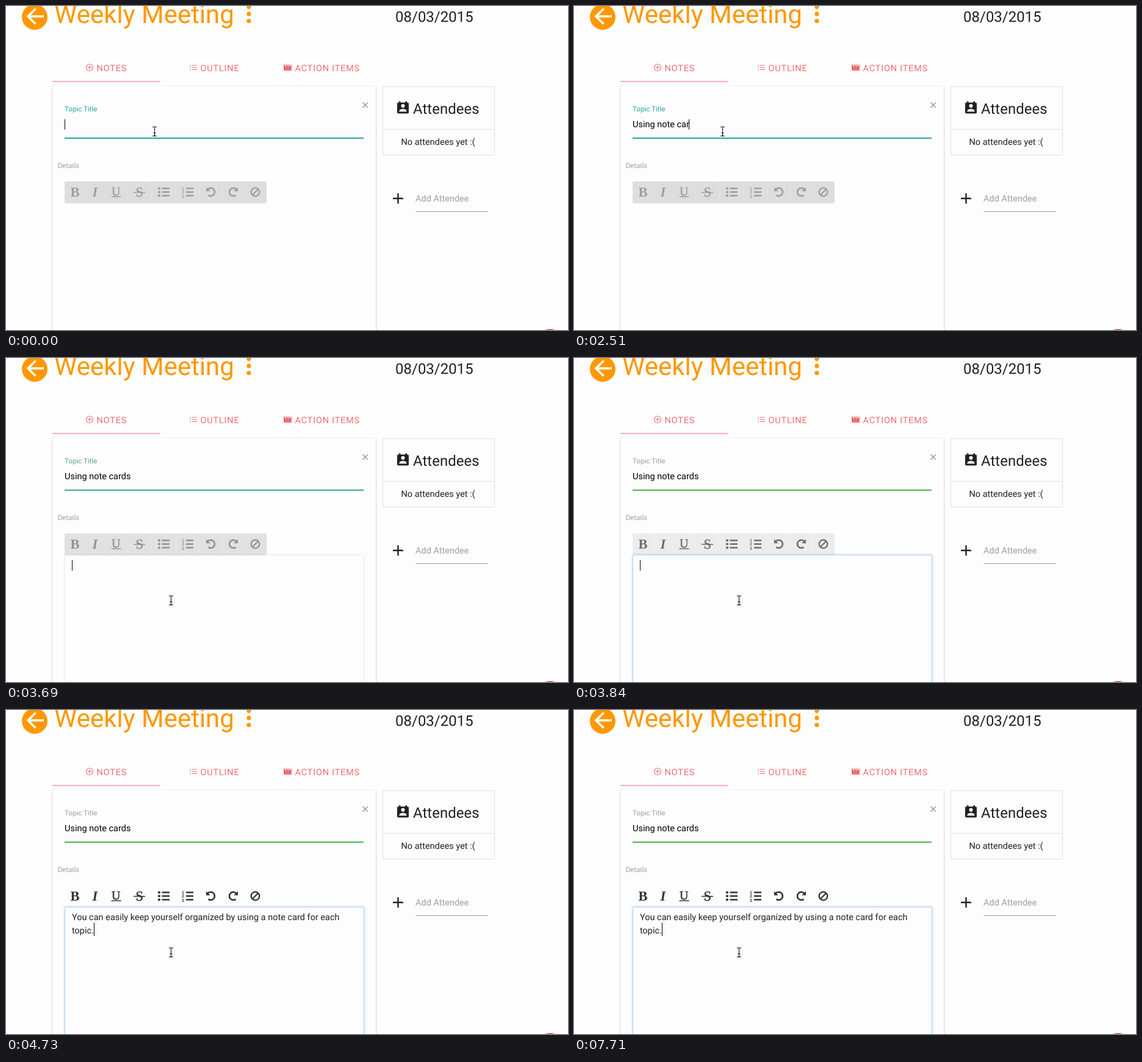
An HTML page for the animation above (8 s loop, 921 by 532 pixels).

```html
<!DOCTYPE html>
<html lang="en">
<head>
<meta charset="utf-8">
<title>Weekly Meeting</title>
<style>
  html, body { margin: 0; width: 100%; height: 100%; overflow: hidden; background: #fdfdfd; }
  svg { display: block; width: 921px; height: 532px; }
  text { font: 14.5px Roboto, sans-serif; fill: #212121; white-space: pre; text-rendering: geometricPrecision; }
  .big { font-size: 24px; }
  .small { font-size: 11.6px; fill: #9e9e9e; }
  .tab text { fill: #ee6e73; letter-spacing: .8px; }
  .line { fill: none; stroke: currentColor; }
  #tools { color: #9e9e9e; fill: currentColor; }
  #tools text { font: bold 22.5px "Liberation Serif", serif; fill: currentColor; }
  #tools .num { font: bold 7px "Liberation Sans", sans-serif; }
  .card { filter: drop-shadow(0 1px 1.5px rgba(0,0,0,.3)); }
</style>
</head>
<body>
<svg viewBox="0 0 921 532">
  <rect width="921" height="532" fill="#fdfdfd"/>

  <g fill="#ff9800">
    <circle cx="47" cy="18" r="21"/>
    <path d="M62 17H36M48.5 4.500L36 17L48.500 29.500" fill="none" stroke="#fff" stroke-width="3.600"/>
    <text x="79" y="28" style="font-size:42px;fill:#ff9800">Weekly Meeting</text>
    <circle cx="398" cy="1.500" r="3.600"/><circle cx="398" cy="13" r="3.600"/><circle cx="398" cy="24.500" r="3.600"/>
  </g>
  <text class="big" x="638" y="26">08/03/2015</text>

  <g class="tab" color="#ee6e73" fill="#ee6e73">
    <g class="line" stroke-width="1.200">
      <circle cx="137" cy="101" r="5.500"/>
      <path d="M134 101h6M137 98v6"/>
      <path d="M301 97.500h2m1.500 0h8.500M301 101h2m1.500 0h8.500M301 104.500h2m1.500 0h8.500"/>
    </g>
    <path d="M455 96h1.500l1.200 2.500h2L458.500 96h2l1.200 2.500h2L462.500 96h2l1.200 2.500h1.500L466.500 96h1.500v10h-13z"/>
    <text x="148.500" y="107">NOTES</text>
    <text x="318.500" y="107">OUTLINE</text>
    <text x="473.500" y="107">ACTION ITEMS</text>
    <rect x="76" y="123" width="177" height="2" fill="#f6b2b5"/>
  </g>

  <rect class="card" x="76" y="132" width="530" height="420" rx="1.500" fill="#fdfdfd"/>
  <path d="M584.500 158.500l8.500 8.500m0-8.500l-8.500 8.500" stroke="#8c8c8c" stroke-width="1.100"/>
  <text id="label" class="small" x="96" y="173">Topic Title</text>
  <text id="topic" x="96" y="199" style="fill:#000"></text>
  <rect id="rule" x="96" y="216" width="490" height="2"/>
  <text class="small" x="84.500" y="266">Details</text>

  <g id="tools">
    <g id="bar">
      <rect x="96" y="288" width="331" height="36" rx="2.500"/>
      <path d="M131.500 288v36M162.500 288v36M199.500 288v36M238.500 288v36M278.500 288v36M317.500 288v36M354.500 288v36M390.500 288v36" stroke="#fff" stroke-opacity=".2"/>
    </g>
    <text x="105.500" y="313">B</text>
    <text x="141.500" y="313" style="font-style:italic">I</text>
    <text x="173" y="310.500" style="font-size:20px;font-weight:400" stroke="currentColor" stroke-width=".5">U</text>
    <text x="212.500" y="313" style="font-weight:400" stroke="currentColor" stroke-width=".5">S</text>
    <path d="M172.500 312.500h16v1.500h-16zM209 305.200h19v1.500h-19z"/>
    <circle cx="251" cy="299.500" r="2.100"/><circle cx="251" cy="305.500" r="2.100"/><circle cx="251" cy="311.500" r="2.100"/>
    <g class="line" stroke-width="2.600">
      <path d="M255.500 299.500h12.500m-12.500 6h12.500m-12.500 6h12.500M295 299.500h12m-12 6h12m-12 6h12"/>
      <path d="M330.500 301.200A6.500 6.500 0 1 1 331.500 310.600"/>
      <path d="M377.500 301.200A6.500 6.500 0 1 0 376.500 310.600"/>
      <circle cx="408.500" cy="305.500" r="6.800" stroke-width="2.300"/>
      <path d="M404 310l9-9" stroke-width="2.300"/>
    </g>
    <path d="M328 297.500v6.800h6.800zM380 297.500v6.800h-6.800z"/>
    <text class="num" x="288" y="301.500">1</text>
    <text class="num" x="288" y="308">2</text>
    <text class="num" x="288" y="314.500">3</text>
  </g>

  <g id="editor" fill="none" stroke="#8fc4f5">
    <rect x="96.500" y="323.500" width="490" height="230" rx="3" stroke-width="6" opacity=".14"/>
    <rect x="96.500" y="323.500" width="490" height="230" rx="3" stroke-width="3.500" opacity=".22"/>
    <rect x="96.500" y="323.500" width="490" height="230" rx="3" fill="#fdfdfd" stroke="#b5d6f5"/>
  </g>
  <g id="note">
    <text x="108" y="345">You can easily keep yourself organized by using a note card for each</text>
    <text x="108" y="367">topic.</text>
  </g>
  <rect id="caret" width="1"/>

  <g fill="none" stroke="#e0e0e0">
    <rect x="617.500" y="132.500" width="183" height="112"/>
    <path d="M618 202.500h182"/>
  </g>
  <g fill="#212121">
    <path d="M644 156.500h2.500v2h8v-2h2.500v2h1q2 0 2 2v14q0 2-2 2h-15q-2 0-2-2v-14q0-2 2-2h1z"/>
    <circle cx="650.500" cy="164" r="3" fill="#fdfdfd"/>
    <path d="M644.500 173.500v-1q0-3.500 6-3.500t6 3.500v1z" fill="#fdfdfd"/>
    <text class="big" x="667" y="177">Attendees</text>
    <text x="647.500" y="228">No attendees yet :(</text>
    <path d="M634 314.800h17v2.400h-17zM641.300 307.500h2.400v17h-2.400z"/>
  </g>
  <text x="671" y="321" style="fill:#9e9e9e">Add Attendee</text>
  <rect x="671" y="337" width="119" height="1" fill="#9e9e9e"/>
  <circle cx="891.500" cy="557.500" r="27" fill="#bf5038"/>

  <g id="mouse" fill="none">
    <path id="beam" d="M-3.500-7.500h2Q0-7.500 0-6Q0-7.500 1.500-7.500h2M0-6.500V6.500M-3.500 7.500h2Q0 7.500 0 6Q0 7.500 1.500 7.500h2M-2 2.500h4" stroke="#fff" stroke-width="2.400" stroke-opacity=".7"/>
    <use href="#beam" style="display:none"/>
    <path d="M-3.500-7.500h2Q0-7.500 0-6Q0-7.500 1.500-7.500h2M0-6.500V6.500M-3.500 7.500h2Q0 7.500 0 6Q0 7.500 1.500 7.500h2M-2 2.500h4" stroke="#111" stroke-width="1.100"/>
  </g>
</svg>
<script>
const $ = id => document.getElementById(id);
const LOOP = 8000, TITLE = 'Using note cards';
// Each pair is [start time, value held from then on].
const typed = [[0, 0], [440, 1], [590, 2], [735, 3], [880, 4], [1030, 6], [1330, 7], [1470, 8],
  [1620, 9], [1765, 10], [1910, 12], [2210, 13], [2510, 14], [2800, 16]];
const travel = [[0, 0], [3100, .15], [3250, .7], [3400, 1]];
const focus = [[0, 0], [3690, .12], [3840, .46], [3990, .85], [4140, 1]];
const blinks = [3100, 3690, 4430, 4730, 5180, 5620, 6220, 6670, 7120, 7710];

const held = (steps, t) => steps.findLast(([start]) => start <= t)[1];
const mix = (a, b, p) => a + (b - a) * p;
const gray = (a, b, p) => `rgb(${Array(3).fill(Math.round(mix(a, b, p)))})`;
const set = (el, attrs) => Object.entries(attrs).forEach(([k, v]) => el.setAttribute(k, v));

function draw(t) {
  const p = held(focus, t), move = held(travel, t), noted = t >= 4730;
  const topic = $('topic');
  topic.textContent = TITLE.slice(0, held(typed, t));

  const blurred = p > .4;
  $('label').style.fill = blurred ? '#9e9e9e' : p ? '#62a29c' : '#26a69a';
  $('rule').style.fill = blurred ? '#4caf50' : p ? '#39aa75' : '#26a69a';

  $('tools').style.color = gray(158, 51, p);
  $('bar').style.fill = gray(221, 253, p);
  $('bar').style.opacity = p === 1 ? 0 : 1;
  $('editor').style.opacity = Math.min(1, p * 2.5);
  $('note').style.display = noted ? '' : 'none';

  const shown = blinks.filter(b => b <= t).length % 2 === 0;
  const x = noted ? 144 : p ? 108 : 96 + Math.floor(topic.textContent ? topic.getComputedTextLength() : 0);
  set($('caret'), {
    x, y: noted ? 349 : p ? 332 : 186, height: noted ? 22 : 17,
    visibility: shown ? 'visible' : 'hidden'
  });
  set($('mouse'), { transform: `translate(${mix(243.5, 270.5, move)} ${mix(206, 398, move)})` });
}

function tick() {
  draw(performance.now() % LOOP);
  requestAnimationFrame(tick);
}
tick();
</script>
</body>
</html>
```
